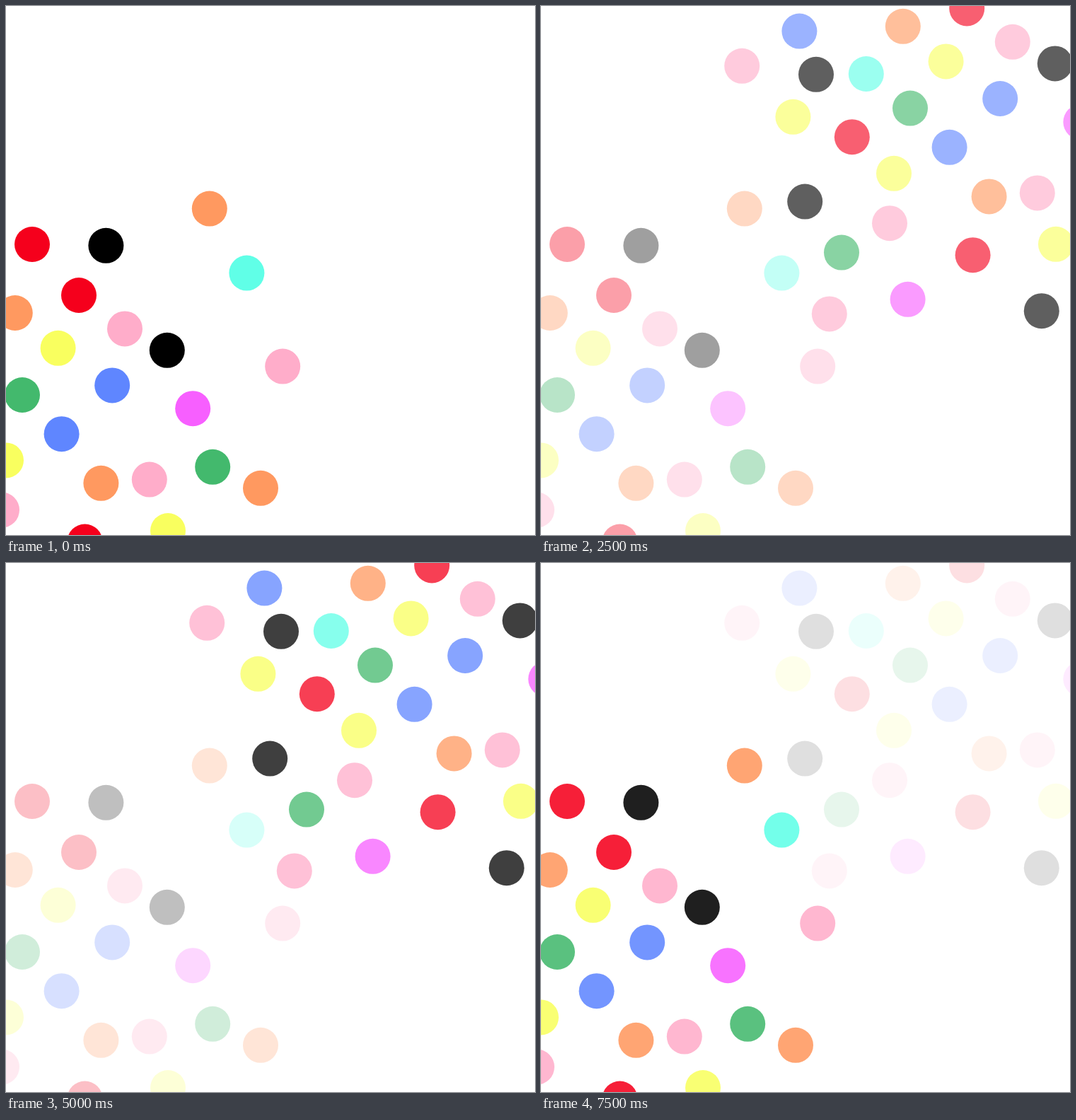
An HTML page that plays this animation: 748 px wide and 748 px high, repeating every 8 s.

```html
<!DOCTYPE html>
<html lang="en">
<head>
<meta charset="utf-8">
<title>Fading dots</title>
<style>
  html, body { margin: 0; width: 100%; height: 100%; overflow: hidden; background: #fff; }
  svg { display: block; width: 100vw; height: 100vh; }
</style>
</head>
<body>
<svg viewBox="0 0 748 748">
  <g id="lower"></g>
  <g id="upper"></g>
</svg>
<script>
  const RADIUS = 25;
  const LOOP = 8000;
  const STEPS = 8;

  const colors = {
    red: '#f5001c', black: '#000', orange: '#ff9960', cyan: '#60ffe7', pink: '#ffadca',
    yellow: '#f9ff5f', green: '#43b96d', blue: '#5f86ff', magenta: '#f75fff'
  };

  // Dot centres as x, y pairs, grouped by colour.
  const groups = {
    lower: {
      red: [37, 337, 103, 409, 111.5, 757.5],
      black: [141.4, 338.8, 227.8, 486.8],
      orange: [287.8, 286.6, 12.8, 434, 134.4, 674.8, 360, 681.8],
      cyan: [340.4, 377.6],
      pink: [168, 456.4, 391.2, 509.6, 202.8, 669.6, -6, 712.6],
      yellow: [73.6, 483.8, 0, 642.4, 229, 742],
      green: [23, 550, 292.2, 651.8],
      blue: [150.2, 536.4, 78.6, 605.2],
      magenta: [264.2, 569.2]
    },
    upper: {
      red: [602.2, 3.4, 439.8, 185.2, 610.6, 352.2],
      black: [389, 96.8, 726.8, 81.4, 373.2, 276.6, 707.8, 431.2],
      orange: [511.8, 28.8, 633.6, 269.4],
      cyan: [459.8, 96],
      pink: [284.2, 84.8, 666.8, 50.8, 493, 307.2, 701.8, 264.4, 407.8, 435.4],
      yellow: [572.6, 78.4, 356.4, 156.8, 499, 236.8, 728, 336.8],
      green: [522, 144.6, 425, 348.6],
      blue: [365.4, 35.6, 649.2, 131, 577.6, 199.8],
      magenta: [763.4, 164, 518.6, 414.8]
    }
  };

  function addDot(parent, x, y, fill) {
    const dot = document.createElementNS('http://www.w3.org/2000/svg', 'circle');
    const attrs = { cx: x, cy: y, r: RADIUS, fill };
    for (const key in attrs) dot.setAttribute(key, attrs[key]);
    parent.append(dot);
  }

  function fade(el, from, to) {
    const easing = `steps(${STEPS}, end)`;
    el.animate(
      [{ opacity: from, easing }, { opacity: to, easing }, { opacity: from }],
      { duration: LOOP, iterations: Infinity }
    );
  }

  for (const id in groups) {
    const el = document.getElementById(id);
    for (const [name, points] of Object.entries(groups[id])) {
      for (let i = 0; i < points.length; i += 2) {
        addDot(el, points[i], points[i + 1], colors[name]);
      }
    }
  }

  fade(document.getElementById('lower'), 1, 0);
  fade(document.getElementById('upper'), 0, 1);
</script>
</body>
</html>
```
